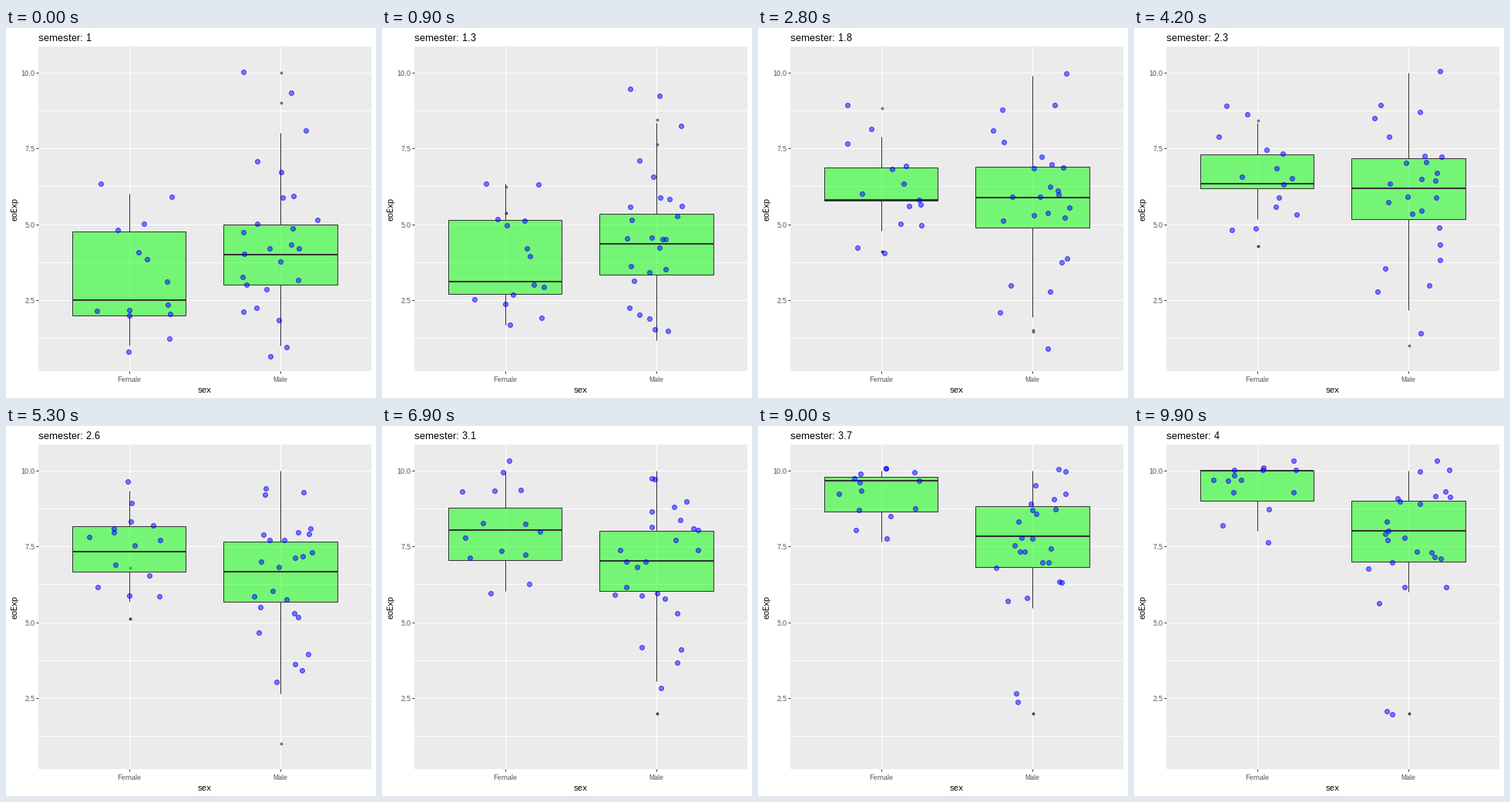
These frames come from a looping animation (480x480 px, 10 s). A matplotlib script:

```python
import numpy as np
import matplotlib.pyplot as plt
from matplotlib.animation import FuncAnimation
from matplotlib.patches import Rectangle

plt.rcParams.update({
    "font.family": "Liberation Sans",
    "text.hinting": "native",
    "text.hinting_factor": 1,
})

SIZE, DPI = 480, 72
FRAMES, STEP = 100, 33          # frames per loop, frames per semester
LEFT, RIGHT, TOP, BOTTOM = 42, 474, 24, 445
HALF = 73.7                     # half width of a box
SPREAD_X, SPREAD_Y = 57, 0.38   # jitter in pixels and in score units
DARK, GREY = "#333333", "#4D4D4D"

# Per semester: low, Q1, median, Q3, high, then any outliers
GROUPS = [
    dict(name="Female", x=160.0, count=14,
         stats=[(1, 2, 2.5, 4.75, 6), (5, 6, 6, 7, 8),
                (6, 7, 8, 8.75, 10), (8, 9, 10, 10, 10)],
         outliers=[[], [9, 4, 4], [], []]),
    dict(name="Male", x=356.4, count=25,
         stats=[(1, 3, 4, 5, 8), (2, 5, 6, 7, 10),
                (3, 6, 7, 8, 10), (6, 7, 8, 9, 10)],
         outliers=[[10, 9], [1], [], [2, 2]]),
]

rng = np.random.default_rng(4)


def raw_y(value):
    return 57.25 + 39.36 * (10 - np.asarray(value, float))


def to_y(value):
    """Pixel row of a score, as the lower edge of that row."""
    return np.ceil(raw_y(value))


def mix(a, b, e):
    return a + (b - a) * e


def scatter_students(group, semester):
    """Whole scores that fit the summary, loosely kept in order, jittered."""
    n, outs = group["count"], group["outliers"][semester]
    levels = np.linspace(0, 1, n - len(outs))
    body = np.interp(levels, np.linspace(0, 1, 5), group["stats"][semester])
    ranked = np.sort(np.append(np.rint(body), outs))[::-1]
    order = np.argsort(np.linspace(0, 1, n) + rng.normal(0, 0.3, n))
    scores = np.empty(n)
    scores[order] = ranked
    x = group["x"] + rng.uniform(-SPREAD_X, SPREAD_X, n)
    y = raw_y(scores + rng.uniform(-SPREAD_Y, SPREAD_Y, n))
    return np.column_stack([x, y])


POINTS = [np.vstack([scatter_students(g, s) for g in GROUPS])
          for s in range(4)]


def pad(values, other):
    """Fill a short list with its mean, or the other list's mean if empty."""
    missing = max(len(other) - len(values), 0)
    fill = np.mean(values or other) if missing else 0
    return np.array(values + [fill] * missing, float)


def tween_outliers(states, seg, t, e):
    if t in (0, 1):
        return np.array(states[seg + int(t)], float)
    a, b = states[seg], states[seg + 1]
    return mix(pad(a, b), pad(b, a), e)


fig = plt.figure(figsize=(SIZE / DPI, SIZE / DPI), dpi=DPI, facecolor="white")
ax = fig.add_axes([0, 0, 1, 1])
ax.set_xlim(0, SIZE)
ax.set_ylim(SIZE, 0)
ax.axis("off")


def line(xs, ys, color=DARK, width=1, z=1):
    return ax.plot(xs, ys, color=color, lw=width, zorder=z,
                   solid_capstyle="butt")[0]


def dots(diameter, rgb, z):
    """Half clear dots with a denser rim."""
    return ax.scatter([], [], s=diameter ** 2, lw=1, zorder=z,
                      facecolor=(*rgb, 0.5), edgecolor=(*rgb, 0.65))


# Panel, grid and axes
ax.add_patch(Rectangle((LEFT, TOP), RIGHT - LEFT, BOTTOM - TOP,
                       fc="#EBEBEB", ec="none", zorder=0))
for v in np.arange(1.25, 10.1, 1.25):
    line([LEFT, RIGHT], [to_y(v)] * 2, "white")
for v in (2.5, 5.0, 7.5, 10.0):
    line([LEFT - 3, LEFT], [to_y(v)] * 2)
    ax.text(37.5, to_y(v) + 4, f"{v:.1f}", size=9, color=GREY, ha="right")
for g in GROUPS:
    line([g["x"]] * 2, [TOP, BOTTOM], "white")
    line([g["x"]] * 2, [BOTTOM, BOTTOM + 3])
    ax.text(g["x"] - 0.5, 459, g["name"], size=9, color=GREY, ha="center")
ax.text(257.5, 473, "sex", size=11, ha="center")
ax.text(12, 235, "eoExp", size=11, rotation=90, ha="center", va="center")
title = ax.text(42, 17, "", size=13)

# Moving parts
outliers = dots(2.8, (0.2, 0.2, 0.2), 2)
boxes = []
for g in GROUPS:
    left, right = np.floor([g["x"] - HALF, g["x"] + HALF])
    whiskers = [line([g["x"]] * 2, [0, 0], z=3) for _ in range(2)]
    box = ax.add_patch(Rectangle((left, 0), right - left, 0, lw=1, zorder=4,
                                 fc=(0, 1, 0, 0.5), ec=DARK))
    median = line([left, right], [0, 0], width=2, z=5)
    boxes.append((whiskers, box, median))
students = dots(6, (0, 0, 1), 6)


def update(k):
    seg = min(k // STEP, 2)
    t = (k - seg * STEP) / STEP
    e = (1 - np.cos(np.pi * t)) / 2

    semester = 1 + 3 * k / (FRAMES - 1)
    title.set_text(f"semester: {round(semester, 1):g}")

    spots = []
    for g, (whiskers, box, median) in zip(GROUPS, boxes):
        a, b = np.array(g["stats"][seg:seg + 2], float)
        low, q1, mid, q3, high = to_y(mix(a, b, e))
        whiskers[0].set_ydata([low, q1])
        whiskers[1].set_ydata([q3, high])
        box.set_y(q3)
        box.set_height(q1 - q3)
        median.set_ydata([mid, mid])
        spots += [(g["x"] + 0.5, to_y(v) - 0.5)
                  for v in tween_outliers(g["outliers"], seg, t, e)]

    outliers.set_offsets(np.array(spots, float).reshape(-1, 2))
    students.set_offsets(mix(POINTS[seg], POINTS[seg + 1], e))
    return []


anim = FuncAnimation(fig, update, frames=FRAMES, interval=100,
                     repeat=True, repeat_delay=0)
plt.show()
```
